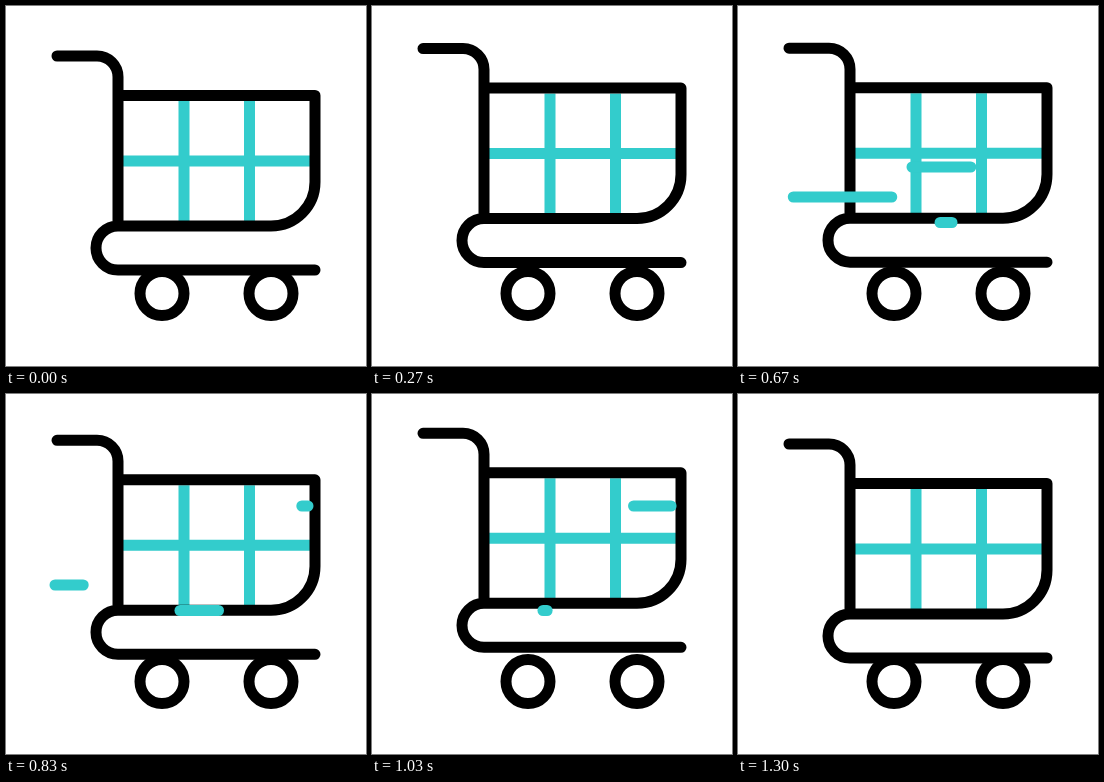
These frames come from a looping animation (360 px wide and 360 px high, 2 s). An HTML page:

```html
<!DOCTYPE html>
<html lang="en">
<head>
<meta charset="utf-8">
<title>Shopping cart</title>
<style>
  html, body { margin: 0; height: 100%; overflow: hidden; background: #fff; }
  svg { display: block; width: 100vw; height: 100vh; }
  path, circle { fill: none; stroke: #000; stroke-width: 11; stroke-linejoin: round; }
  .outline, .streak { stroke-linecap: round; }
  .grid, .streak { stroke: #33cccc; }
</style>
</head>
<body>
<svg viewBox="0 0 360 360">
  <circle cx="156" cy="287.5" r="22"/>
  <circle cx="265" cy="287.5" r="22"/>
  <g id="cart">
    <path class="grid" d="M178 95V215M243.5 95V215M117 155H304"/>
    <path class="outline" d="M51 50H91A21 21 0 0 1 112 71V220M112 89.5H309V176A44 44 0 0 1 265 220H112A22 22 0 0 0 112 264H309"/>
  </g>
  <g id="streaks"></g>
</svg>
<script>
const LOOP = 2000;
const cart = document.getElementById('cart');
const layer = document.getElementById('streaks');

// [time, vertical offset]
const bounce = [[30, 0], [190, -12.5], [390, 0], [600, -12], [780, -1.5], [1010, -11.5], [1300, 0]];

const streaks = [
  { y: 161, from: 304, to: 174, start: 325 },
  { y: 191, from: 159, to: 49, start: 440 },
  { y: 216.5, from: 214, to: 171, start: 603 },
  { y: 112, from: 302, to: 260, start: 795 },
];
for (const s of streaks) {
  s.path = document.createElementNS('http://www.w3.org/2000/svg', 'path');
  s.path.setAttribute('class', 'streak');
  layer.append(s.path);
}

const progress = (t, start, duration) => Math.min(1, Math.max(0, (t - start) / duration));

function offsetAt(t) {
  let y = bounce[0][1];
  for (let i = 1; i < bounce.length; i++) {
    const [t0, y0] = bounce[i - 1], [t1, y1] = bounce[i];
    y += (y1 - y0) * progress(t, t0, t1 - t0);
  }
  return y;
}

function draw(now) {
  const t = now % LOOP;
  cart.setAttribute('transform', `translate(0 ${offsetAt(t)})`);
  for (const { path, y, from, to, start } of streaks) {
    const head = progress(t, start, 245);
    const tail = progress(t, start + 220, 230);
    const x = p => from + (to - from) * p;
    path.setAttribute('d', head > tail ? `M${x(tail)} ${y}H${x(head)}` : '');
  }
}

const origin = performance.now();
function tick() {
  draw(performance.now() - origin);
  requestAnimationFrame(tick);
}
tick();
</script>
</body>
</html>
```
